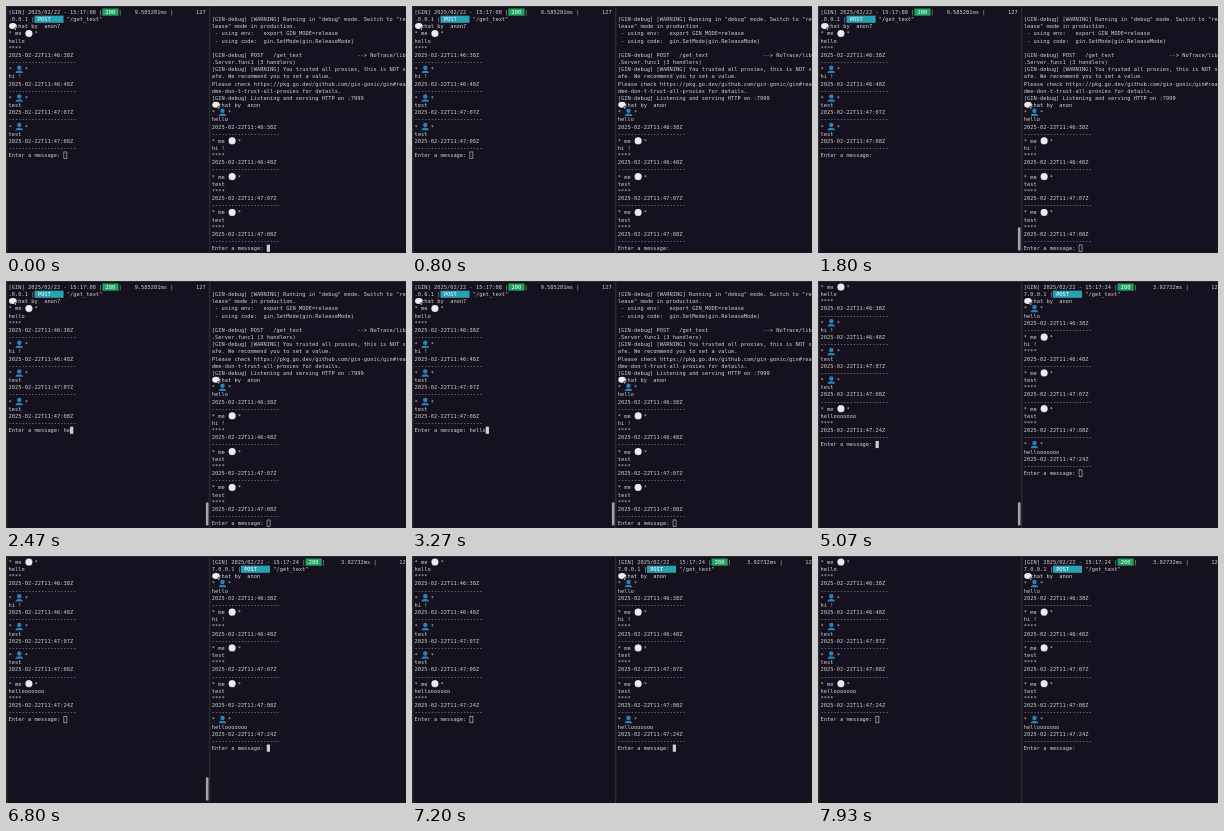
Recreate the animation shown at these times as an HTML page with a canvas. Size 400 px wide and 247 px high, loop 8000 ms.

```html
<!DOCTYPE html>
<html lang="en">
<head>
<meta charset="utf-8">
<title>Terminal chat</title>
<style>
html, body { margin: 0; width: 100%; height: 100%; overflow: hidden; background: #15111f; }
canvas { display: block; }
</style>
</head>
<body>
<canvas id="stage" width="400" height="247"></canvas>
<script>
const ctx = document.getElementById('stage').getContext('2d');
const LOOP = 8000, CW = 3.233, LH = 7.157, TOP = 2.5;
const LEFT = 2.6, RIGHT = 205.8;
const FG = '#d0cfcc', BG = '#15111f', GREEN = '#1ea560', CYAN = '#2aa1b3', FRAME = '#2a2a2c';

// Times in ms
const FOCUS_LEFT = 1200, SEND = 5070, FOCUS_RIGHT = 6800;
const KEYS = [2130, 2470, 2730, 2870, 3270, 3600, 3930, 4130, 4270, 4470, 4530];
const BLINK_RESETS = [-200, FOCUS_LEFT, 2070, ...KEYS, SEND, FOCUS_RIGHT];
const WORD = 'hell' + 'o'.repeat(7);
const PROMPT = 'Enter a message: ';

const CHAT = [
  ['left', 'hello', '46:38'],
  ['right', 'hi !', '46:48'],
  ['right', 'test', '47:07'],
  ['right', 'test', '47:08'],
  ['left', WORD, '47:24']
];

function chatLines(side, count) {
  return CHAT.slice(0, count).flatMap(([from, text, time]) => {
    const mine = from === side;
    return [mine ? '* me ⚪ *' : '* 👤 *', text, ...(mine ? ['****'] : []),
      `2025-02-22T11:${time}Z`, '-'.repeat(21)];
  });
}

function requestLog(time, latency, width) {
  const line = `[GIN] 2025/02/22 - ${time} |     | ${latency.padStart(13)} |       127.0.0.1 |`;
  return [line.slice(0, width), line.slice(width, 67) + ' |          "/get_text"'];
}

const STARTUP = [
  '',
  '[GIN-debug] [WARNING] Running in "debug" mode. Switch to "re',
  'lease" mode in production.',
  ' - using env:   export GIN_MODE=release',
  ' - using code:  gin.SetMode(gin.ReleaseMode)',
  '',
  '[GIN-debug] POST   ' + '/get_text'.padEnd(25) + ' --> NoTrace/lib',
  '.Server.func1 (3 handlers)',
  '[GIN-debug] [WARNING] You trusted all proxies, this is NOT s',
  'afe. We recommend you to set a value.',
  'Please check https://pkg.go.dev/github.com/gin-gonic/gin#rea',
  'dme-don-t-trust-all-proxies for details.',
  '[GIN-debug] Listening and serving HTTP on :7999'
];

const leftBefore = [...requestLog('15:17:08', '9.585281ms', 61), '💬chat by  anon7', ...chatLines('left', 4)];
const leftAfter = chatLines('left', 5);
const rightBefore = [...STARTUP, '💬chat by  anon', ...chatLines('right', 4)];
const rightAfter = [...requestLog('15:17:24', '3.92732ms', 60), '💬chat by  anon', ...chatLines('right', 5)];

function disc(x, y, r, color) {
  ctx.fillStyle = color;
  ctx.beginPath();
  ctx.arc(x, y, r, 0, 7);
  ctx.fill();
}

// Each icon is drawn around its centre
const ICONS = {
  '⚪': (x, y) => {
    disc(x, y, 3.6, '#b4b8ba');
    disc(x - .1, y - .2, 3.2, '#ececec');
  },
  '👤': (x, y) => {
    disc(x, y - 1.6, 2.2, '#2b82b8');
    ctx.beginPath();
    ctx.moveTo(x - 3.8, y + 3.7);
    ctx.bezierCurveTo(x - 3.8, y + .4, x + 3.8, y + .4, x + 3.8, y + 3.7);
    ctx.fill();
  },
  '💬': (x, y) => {
    ctx.fillStyle = '#eeeeee';
    ctx.beginPath();
    ctx.ellipse(x, y - .5, 3.8, 3, 0, 0, 7);
    ctx.moveTo(x + .5, y + 2);
    ctx.lineTo(x + 3.3, y + 3.6);
    ctx.lineTo(x + 3, y + .5);
    ctx.fill();
  }
};

const rowTop = row => TOP + row * LH;

function write(text, x, row, color = FG) {
  ctx.save();
  ctx.translate(x, rowTop(row) + 5.5);
  ctx.scale(.1, .1);
  ctx.font = '53.7px "DejaVu Sans Mono", monospace';
  ctx.fillStyle = color;
  ctx.fillText(text, 0, 0);
  ctx.restore();
}

function line(text, x, row) {
  for (const icon in ICONS) {
    const col = text.indexOf(icon);
    if (col < 0) continue;
    text = text.replace(icon, '  ');
    ICONS[icon](x + col * CW + 4.2, rowTop(row) + 3.6);
  }
  write(text, x, row);
}

function badge(text, x, col, row, color) {
  ctx.fillStyle = color;
  ctx.fillRect(x + col * CW, rowTop(row), text.length * CW, LH);
  write(text, x + col * CW, row, '#ffffff');
}

function cursor(x, col, row, focused, lit) {
  const cx = x + col * CW, cy = rowTop(row);
  if (!focused) {
    ctx.strokeStyle = FG;
    ctx.lineWidth = .6;
    ctx.strokeRect(cx + .3, cy + .3, CW - .2, LH - .6);
  } else if (lit) {
    ctx.fillStyle = FG;
    ctx.fillRect(cx, cy, CW, LH);
  }
}

function pane(x, lines, typed, focused, lit) {
  lines.forEach((text, row) => line(text, x, row));
  const input = PROMPT + typed;
  line(input, x, lines.length);
  cursor(x, input.length, lines.length, focused, lit);
  if (lines[0].startsWith('[GIN] ')) {
    badge(' 200 ', x, 29, 0, GREEN);
    badge(' POST    ', x, lines[1].indexOf('|') + 1, 1, CYAN);
  }
}

const ramp = (t, from, to) => Math.min(1, Math.max(0, (t - from) / (to - from)));

function draw(t) {
  ctx.fillStyle = BG;
  ctx.fillRect(0, 0, 400, 247);
  ctx.fillStyle = FRAME;
  ctx.fillRect(0, 0, 400, 1);
  ctx.fillRect(0, 0, 1.5, 247);
  ctx.fillRect(202.8, 0, 1.6, 247);

  const sent = t >= SEND;
  const onLeft = t >= FOCUS_LEFT && t < FOCUS_RIGHT;
  const reset = BLINK_RESETS.filter(r => r <= t).pop();
  const lit = (t - reset) % 1200 < 600;
  const typed = sent ? '' : WORD.slice(0, KEYS.filter(k => k <= t).length);

  pane(LEFT, sent ? leftAfter : leftBefore, typed, onLeft, lit);
  pane(RIGHT, sent ? rightAfter : rightBefore, '', !onLeft, lit);

  ctx.globalAlpha = ramp(t, 1200, 1330) * (1 - ramp(t, 6800, 7200));
  ctx.fillStyle = '#a5a4a6';
  ctx.beginPath();
  ctx.roundRect(199.9, 221.3, 2.6, 23.3, 1.2);
  ctx.fill();
  ctx.globalAlpha = 1;
}

const start = performance.now();
function tick() {
  draw((performance.now() - start) % LOOP);
  requestAnimationFrame(tick);
}
tick();
</script>
</body>
</html>
```
